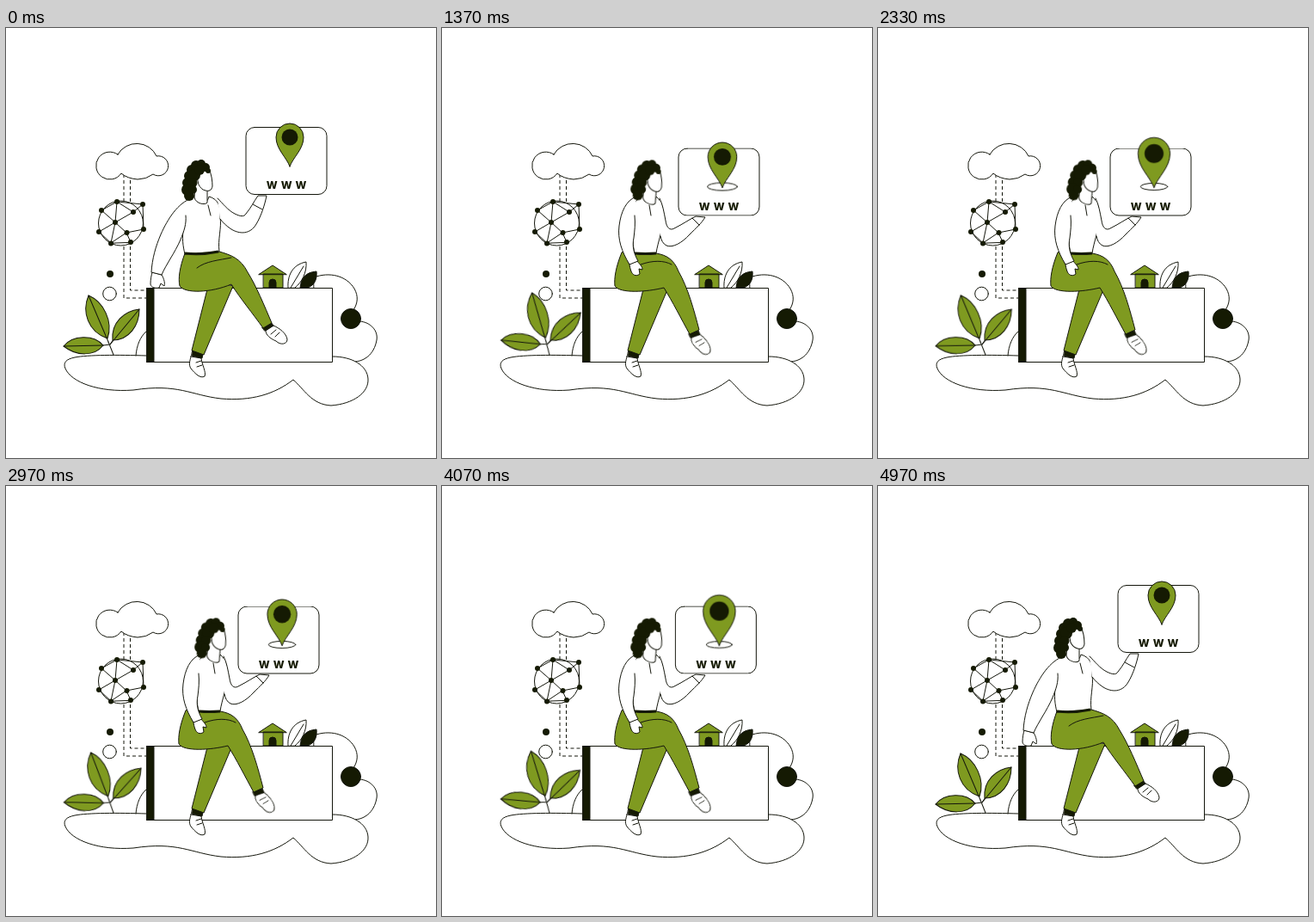
These frames come from a looping animation (500 by 500 pixels, 5 s). An HTML page without scripts:

```html
<!DOCTYPE html>
<html lang="en">
<head>
<meta charset="utf-8">
<title>Web address</title>
<style>
  html, body { margin: 0; width: 100%; height: 100%; overflow: hidden; background: #fff; }
  svg { display: block; width: 100vw; height: 100vh; --dark: #151a03; --green: #7f9a20; }
  svg * { vector-effect: non-scaling-stroke; }
  .ink { fill: #fff; stroke: #14160c; stroke-width: 1; stroke-linejoin: round; stroke-linecap: round; }
  .line { fill: none; }
  .green { fill: var(--green); }
  .dark { fill: var(--dark); }
  .none { stroke: none; }
  .dash { fill: none; stroke-dasharray: 4 3; stroke-linecap: butt; }
  .belt { fill: none; stroke: var(--dark); stroke-width: 3; stroke-linecap: butt; }

  /* --a upright, --m halfway, --c leaning forward */
  .pose { d: var(--a); animation: pose 5s infinite; }
  .move { transform: var(--a); animation: move 5s infinite; }
  @keyframes pose {
    0% { d: var(--a); }
    4.6% { d: var(--a); animation-timing-function: cubic-bezier(.4, 0, .65, .49); }
    11.4% { d: var(--m); animation-timing-function: cubic-bezier(.3, .5, .6, 1); }
    16.6% { d: var(--c); }
    83.4% { d: var(--c); animation-timing-function: cubic-bezier(.4, 0, .7, .5); }
    88.6% { d: var(--m); animation-timing-function: cubic-bezier(.35, .51, .6, 1); }
    95.4%, 100% { d: var(--a); }
  }
  @keyframes move {
    0% { transform: var(--a); }
    4.6% { transform: var(--a); animation-timing-function: cubic-bezier(.4, 0, .65, .49); }
    11.4% { transform: var(--m); animation-timing-function: cubic-bezier(.3, .5, .6, 1); }
    16.6% { transform: var(--c); }
    83.4% { transform: var(--c); animation-timing-function: cubic-bezier(.4, 0, .7, .5); }
    88.6% { transform: var(--m); animation-timing-function: cubic-bezier(.35, .51, .6, 1); }
    95.4%, 100% { transform: var(--a); }
  }

  .drift { animation: drift 5s linear infinite; }
  @keyframes drift {
    0%, 11.4% { transform: translateX(0); }
    27.4% { transform: translateX(-4px); }
    46.6%, 60% { transform: translateX(-9px); }
    72.6% { transform: translateX(-8.4px); }
    88.6% { transform: translateX(-7px); animation-timing-function: ease-out; }
    95.4%, 100% { transform: translateX(0); }
  }
  .pin { animation: pulse calc(5s / 6) cubic-bezier(.37, 0, .63, 1) infinite alternate; }
  @keyframes pulse { from { transform: scale(1); } to { transform: scale(1.18); } }
  .ring { animation: ring 5s linear infinite; }
  @keyframes ring {
    0%, 4.6% { transform: scale(0); }
    11.4% { transform: scale(.67); }
    18%, 28% { transform: scale(1); }
    46%, 73% { transform: scale(.9); }
    83.4% { transform: scale(.85); }
    88.6% { transform: scale(.34); }
    92%, 100% { transform: scale(0); }
  }
  .plant { transform-origin: 125px 380px; animation: sway 1.25s cubic-bezier(.37, 0, .63, 1) infinite alternate; }
  @keyframes sway { from { transform: rotate(0deg); } to { transform: rotate(7.2deg); } }

  text { font: 800 12.2px Inter, "Open Sans", sans-serif; letter-spacing: 3.7px; fill: var(--dark); }
</style>
</head>
<body>
<svg viewBox="0 0 500 500">
  <!-- bushes and ground -->
  <g class="ink">
    <path d="M358 290C376 283 396 288 405 303C410 312 409 320 404 328L411 341C424 342 433 352 431 363C428 380 416 388 404 388L360 388Z"/>
    <path d="M163 381C130 380 95 380 80 383C70 385 66 389 69 396C76 412 108 424 148 421C200 413 215 427 250 431C285 434 312 426 334 409C346 419 355 438 378 439C404 437 422 424 421 408C420 392 402 382 380 382"/>
    <path class="line" d="M151 381C152 369 156 359 163 353"/>
    <circle class="dark" cx="401" cy="338" r="11.5"/>
  </g>

  <!-- cloud, cable and globe -->
  <g class="ink">
    <path class="dash" d="M137 170V314H163M144.500 170V305H163"/>
    <path d="M130 147A25 24 0 0 1 175 149A11.500 11.500 0 1 1 171 170Q163 176 153 176Q141 175 134 169A16 16 0 1 1 130 147Z"/>
    <circle cx="133.500" cy="227" r="26"/>
    <path class="line" d="M111 212L129 202L159 205L148 214L127 226L111 212M129 202L148 214M129 202L127 226L108 237L122 250L127 226L140 238L160 234L159 205M122 250L140 238L145 249Z"/>
    <g class="dark none">
      <circle cx="129" cy="202" r="3"/><circle cx="111" cy="212" r="3"/>
      <circle cx="159" cy="205" r="3"/><circle cx="148" cy="214" r="3"/>
      <circle cx="127" cy="226" r="3"/><circle cx="160" cy="234" r="3"/>
      <circle cx="108" cy="237" r="3"/><circle cx="140.500" cy="238" r="3"/>
      <circle cx="122" cy="250.500" r="3"/><circle cx="145" cy="249" r="3"/>
      <circle cx="121" cy="286" r="4"/>
    </g>
    <circle cx="120.500" cy="309" r="7.800"/>
  </g>

  <!-- swaying plant -->
  <g class="ink plant">
    <path class="line" d="M125 380L119 365M113 369L121 368L125 362"/>
    <g class="green">
      <path d="M67 370C77 357 102 356 113 369C103 382 82 382 67 370Z"/>
      <path d="M96 311C88 330 95 353 118 361C125 341 113 318 96 311Z"/>
      <path d="M155 327C138 329 122 342 124 363C143 363 155 346 155 327Z"/>
    </g>
    <path class="line" d="M67 370L113 369M96 311L119 365M155 327L121 368"/>
  </g>

  <!-- house, small leaves and box -->
  <g class="ink">
    <path class="green" d="M299.500 286H322V302H299.500ZM294 286.500L310 276L326 286.500Z"/>
    <path class="dark" d="M306 302V296A4 4 0 0 1 314 296V302Z"/>
    <path d="M328 302C327 288 333 275 349 272C350 284 344 296 336 302Z"/>
    <path class="line" d="M331 302L346 277"/>
    <path class="dark" d="M342 302C343 291 348 284 361 283C362 292 359 299 351 302Z"/>
    <path d="M163.500 302.500H379.500V388.500H163.500Z"/>
    <path class="dark" d="M164 303H172V388H164Z"/>
  </g>

  <!-- legs -->
  <g class="ink">
    <path d="M215 382L227 384C228 392 233 400 231 405C226 408 220 402 215 396C212 391 214 387 215 382Z"/>
    <path class="line" d="M221 389L227 387M222 394L228 392"/>
    <path class="dark" d="M217 375L229 379L228 384L216 381Z"/>
    <path class="green" d="M236 296L216 375L230 380L264 300Z"/>
    <g class="move" style="transform-origin:305px 347px;--a:translate(0px,0px) rotate(0deg);--m:translate(-8px,6px) rotate(10deg);--c:translate(-11px,9px) rotate(13deg)">
      <path d="M302 352L311 346C318 349 326 355 327 362C327 368 319 369 314 364C307 361 302 357 302 352Z"/>
      <path class="line" d="M308 356L314 351M313 359L318 354"/>
      <path class="dark" d="M298 348L308 342L311 346L301 352Z"/>
    </g>
    <path class="pose green" style="--a:path('M208 262C202 278 200 291 202 300C208 309 238 308 262 298C272 314 287 332 299 349L309 343C300 322 291 300 281 284C273 268 262 264 248 260Z');
      --m:path('M209 262C203 278 200 291 202 300C208 309 238 306 259 301C270 316 280 336 292 353L302 348C296 324 288 300 279 283C273 270 262 262 249 260Z');
      --c:path('M209 261C202 278 200 291 201 300C207 309 238 307 258 302C268 318 278 338 288 356L299 351C293 328 286 302 275 283C270 270 262 264 249 262Z')"/>
    <path class="pose line" style="--a:path('M222 279C232 271 248 270 262 267');--m:path('M222 277C232 270 248 270 262 269');--c:path('M231 275C245 270 258 270 267 275')"/>
  </g>

  <!-- upper body -->
  <g class="ink">
    <path class="pose" style="--a:path('M220 196C210 199 206 210 207 228C204 245 206 254 208 263L248 260C246 246 251 232 249 220C250 208 247 199 236 196C234 206 222 206 220 196Z');
      --m:path('M227 196C216 199 211 210 212 228C210 245 208 254 209 263L249 260C250 246 255 232 254 220C255 208 252 199 242 196C240 206 229 206 227 196Z');
      --c:path('M234 195C224 198 219 210 220 228C222 245 222 254 224 262L249 262C251 248 257 236 256 222C258 210 256 202 249 196C247 206 236 206 234 195Z')"/>
    <path class="pose belt" style="--a:path('M208 262Q228 264 247 260');--m:path('M209 262Q228 263 249 260');--c:path('M224 262Q236 263 249 262')"/>
    <path class="pose line" style="--a:path('M235 206L238 218');--m:path('M238 207L241 219');--c:path('M241 206L243 218')"/>
    <!-- raised arm -->
    <path class="pose" style="--a:path('M246 198C252 204 258 212 266 216C272 219 277 220 279 216C285 209 288 202 293 195L303 195C301 205 297 218 291 228C284 240 272 240 262 234C256 230 252 226 249 222');
      --m:path('M250 199C254 207 256 216 260 222C264 228 269 231 274 229C283 224 289 216 297 209L308 210C304 217 298 228 290 237C280 249 270 250 262 244C258 241 255 240 253 236');
      --c:path('M253 198C257 206 258 214 260 224C261 232 265 236 270 233C280 228 287 223 295 219L306 220C301 228 296 232 288 240C279 250 268 256 261 253C257 251 255 247 254 242')"/>
    <path class="pose line" style="--a:path('M287 205L298 211');--m:path('M290 215L299 225');--c:path('M291 221L299 229')"/>
    <!-- resting arm -->
    <path class="pose" style="--a:path('M170 284L181 287C184 292 185 297 184 300L180 297L178 302C174 303 169 302 168 298C168 292 169 288 170 284Z');
      --m:path('M196 278L205 276C208 282 211 287 211 291L206 288L207 294C203 296 198 291 197 288C196 284 196 281 196 278Z');
      --c:path('M218 274L227 271C230 275 233 277 233 281L229 280L230 286C225 290 221 286 220 283C219 280 218 277 218 274Z')"/>
    <path class="pose" style="--a:path('M216 198C200 203 188 222 180 240C174 254 170 268 169 284L181 287C186 275 196 262 203 246C207 236 210 228 209 218');
      --m:path('M217 198C206 202 200 218 197 234C194 248 194 262 195 278L205 277C206 268 209 258 211 246C213 236 214 228 213 218');
      --c:path('M226 196C214 200 208 214 206 230C204 246 209 260 218 275L228 271C223 262 221 254 223 244C224 236 225 228 224 218')"/>
  </g>

  <!-- head -->
  <g class="move" style="transform-origin:222px 190px;--a:translate(0px,0px) rotate(0deg);--m:translate(7px,0px) rotate(1deg);--c:translate(15px,0px) rotate(4deg)">
    <g class="ink">
      <path d="M220 184L219 197C221 205 232 206 234 203L234 188"/>
      <path d="M221 166L236 164C239 170 240 178 240 184C239 189 236 190 232 189C228 188 226 186 224 182Z"/>
    </g>
    <g class="dark">
      <circle cx="216" cy="165" r="6"/><circle cx="221" cy="160" r="6"/>
      <circle cx="227" cy="158" r="5"/><circle cx="232" cy="162" r="5"/>
      <circle cx="235" cy="166" r="3"/><circle cx="213" cy="172" r="6"/>
      <circle cx="219" cy="171" r="7"/><circle cx="225" cy="165" r="6"/>
      <circle cx="211" cy="180" r="6"/><circle cx="217" cy="180" r="5.500"/>
      <circle cx="211" cy="188" r="7"/><circle cx="213" cy="195" r="6"/>
      <circle cx="217" cy="188" r="5"/>
    </g>
  </g>

  <!-- address card -->
  <g class="move" style="--a:translate(0px,0px);--m:translate(0px,14.5px);--c:translate(0px,24.5px)">
    <g class="drift">
      <rect class="ink" x="279" y="115.500" width="94" height="78" rx="10"/>
      <text x="328" y="187" text-anchor="middle">WWW</text>
      <g transform="translate(330 160)">
        <ellipse class="ink ring" rx="17.500" ry="4.500"/>
      </g>
      <g transform="translate(330 161)">
        <g class="ink pin">
          <path class="green" d="M0 0C-4 -11 -16 -20 -16 -34A16 16 0 0 1 16 -34C16 -20 4 -11 0 0Z"/>
          <circle class="dark none" cy="-34" r="9.500"/>
        </g>
      </g>
    </g>
  </g>
</svg>
</body>
</html>
```
